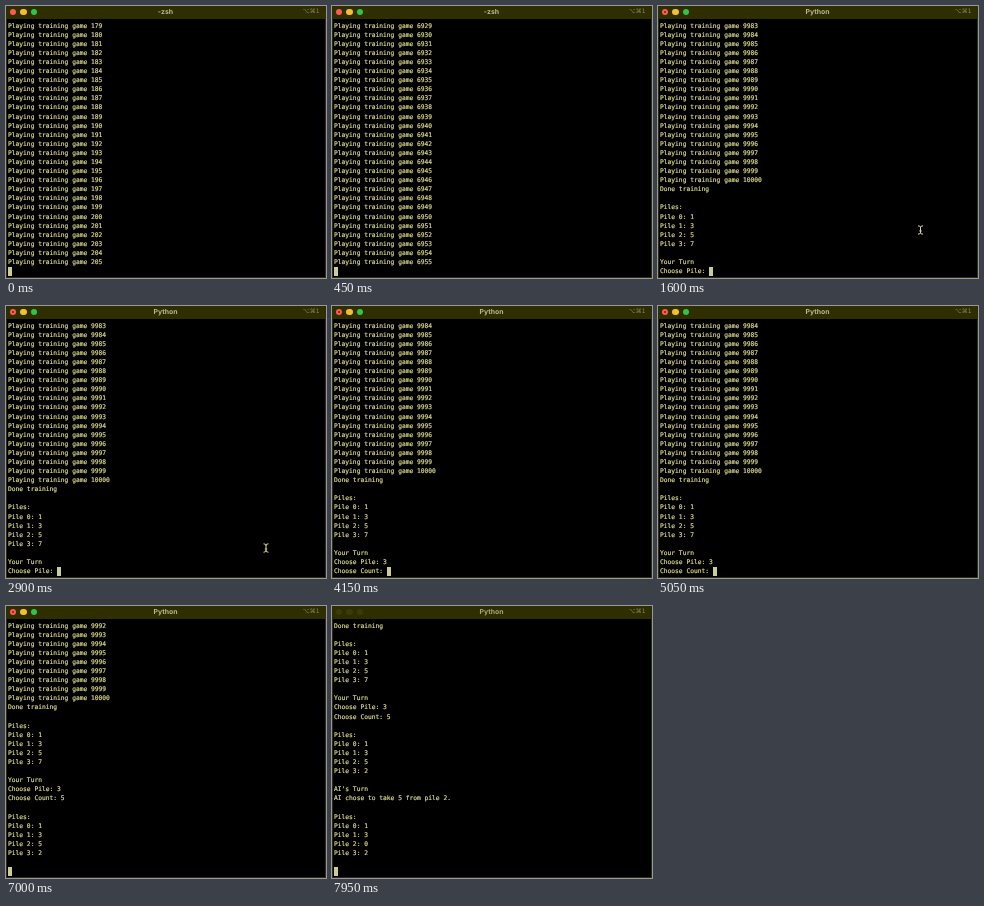
Write an HTML page that moves like this. It is 320 by 272 pixels and loops after 8000 ms.

```html
<!DOCTYPE html>
<html lang="en">
<head>
<meta charset="utf-8">
<title>Terminal</title>
<style>
  html, body { margin: 0; width: 320px; height: 272px; overflow: hidden; background: #000; }
  body { position: relative; text-rendering: geometricPrecision; }
  #bar { position: absolute; width: 320px; height: 12.5px; background: #2e2e00; }
  #bar i { position: absolute; top: 2.7px; width: 6.6px; height: 6.6px; border-radius: 50%; }
  #bar i:nth-child(1) { left: 3.7px; background: #ff5b50; }
  #bar i:nth-child(2) { left: 14.3px; background: #f4bd32; }
  #bar i:nth-child(3) { left: 24.8px; background: #30c641; }
  #bar.busy i:nth-child(1)::after { content: ""; position: absolute; left: 2.3px; top: 2.3px;
    width: 2px; height: 2px; border-radius: 50%; background: #7a1a10; }
  #bar.idle i { background: #3a3a0c; }
  #bar.idle b { color: #a8a67c; }
  #bar b { position: absolute; width: 319px; text-align: center; color: #bab88c;
    font: bold 6.9px/12px Inter, sans-serif; }
  #bar span { position: absolute; right: 6.5px; color: #87875a;
    font: 6px/11px "DejaVu Sans", sans-serif; }
  #edge { position: absolute; inset: 0; border: 1px solid #2e2e00; }
  #log { position: absolute; left: 2px; top: 15.6px; margin: 0; color: #dedc8e;
    -webkit-text-stroke: 0.2px; font: 6.28px/9.09px "DejaVu Sans Mono", monospace; }
  #caret { position: absolute; top: 261px; width: 3.8px; height: 9px; background: #cdcb96; }
  #mouse { position: absolute; left: -4px; top: -5px; fill: none; stroke: #d8d6a4; }
</style>
</head>
<body>
<div id="bar"><i></i><i></i><i></i><b></b><span>⌥⌘1</span></div>
<pre id="log"></pre>
<div id="caret"></div>
<div id="edge"></div>
<svg id="mouse" width="7" height="10"><path d="M1 .8Q3.5 .8 3.5 2.5Q3.5 .8 6 .8M3.5 2V8M1 9.2Q3.5 9.2 3.5 7.5Q3.5 9.2 6 9.2M2.3 6H4.7"/></svg>
<script>
const LOOP = 8000, STEP = 50, ROWS = 28, GAMES = 10000, CHAR = 6.28 * 0.602;
const AT = { done: 650, title: 1000, mouse: 1200, turn: 1550, pile: 3550, pileEnter: 3800,
  count: 6150, countEnter: 6400, ai: 7400, blur: 7900 };
const [bar, log, caret, mouse] = ['bar', 'log', 'caret', 'mouse'].map(id => document.getElementById(id));
const title = bar.querySelector('b');

const piles = (...sizes) => ['', 'Piles:', ...sizes.map((n, i) => `Pile ${i}: ${n}`), ''];

// The last line is the one holding the caret.
function terminal(t) {
  const last = t < AT.done ? 205 + 15 * t : GAMES;
  const lines = Array.from({ length: ROWS }, (_, i) => `Playing training game ${last - ROWS + 1 + i}`);
  if (t >= AT.done) lines.push('Done training', ...piles(1, 3, 5, 7));
  if (t >= AT.turn) lines.push('Your Turn', 'Choose Pile: ' + (t >= AT.pile ? '3' : ''));
  if (t >= AT.pileEnter) lines.push('Choose Count: ' + (t >= AT.count ? '5' : ''));
  if (t >= AT.countEnter) lines.push(...piles(1, 3, 5, 2));
  if (t >= AT.ai) lines.push("AI's Turn", 'AI chose to take 5 from pile 2.', ...piles(1, 3, 0, 2));
  const typing = t >= AT.turn && t < AT.countEnter;
  if (!typing) lines.push('');
  return lines.slice(-ROWS);
}

function draw(t) {
  const lines = terminal(t);
  log.textContent = lines.join('\n');
  caret.style.left = 2 + lines[ROWS - 1].length * CHAR + 'px';
  title.textContent = t < AT.title ? '-zsh' : 'Python';
  bar.className = t >= AT.blur ? 'idle' : t >= AT.title ? 'busy' : '';

  const p = Math.min(1, Math.max(0, (t - 1850) / 800));
  const ease = p * p * (3 - 2 * p);
  mouse.style.visibility = t >= AT.mouse && t < AT.pile ? 'visible' : 'hidden';
  mouse.style.transform = `translate(${263 - 2.5 * ease}px, ${224 + 18 * ease}px)`;
}

const start = performance.now();
function tick() {
  const t = (performance.now() - start) % LOOP;
  draw(Math.floor(t / STEP) * STEP);
  requestAnimationFrame(tick);
}
tick();
</script>
</body>
</html>
```
